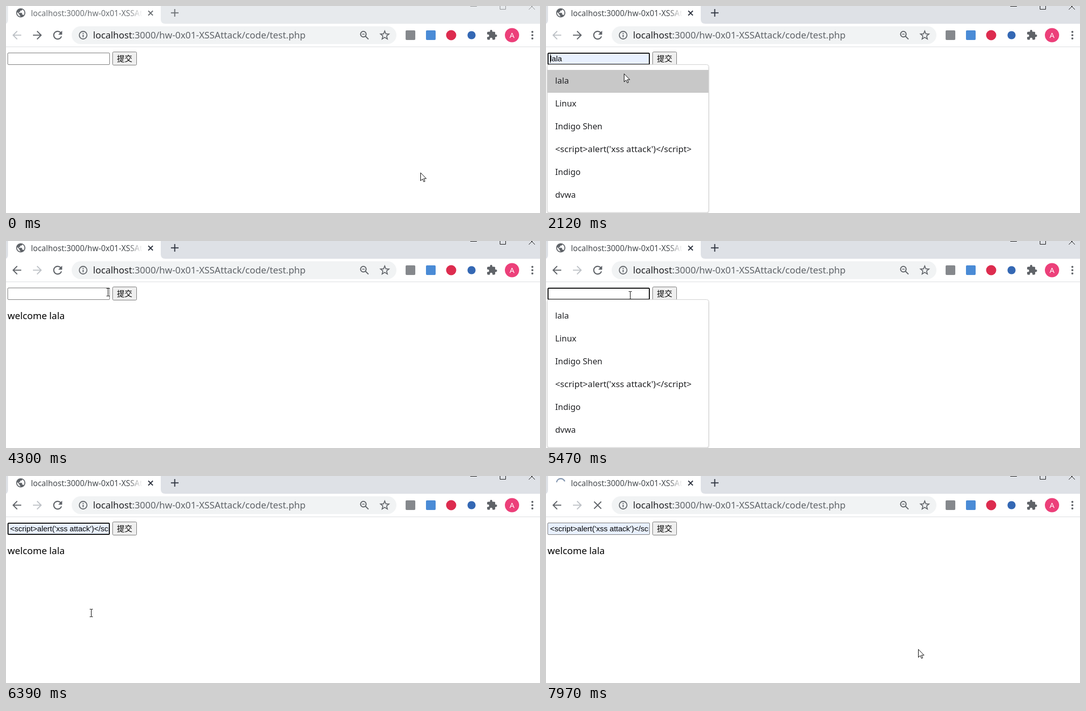
Recreate the animation shown at these times as an HTML page. Size 1049 by 408 pixels, loop 8 s.

```html
<!DOCTYPE html>
<html lang="zh">
<head>
<meta charset="utf-8">
<title>test.php</title>
<style>
  html, body { margin: 0; width: 100%; height: 100%; overflow: hidden; background: #fff; }
  svg { display: block; }
  text { font-family: "Noto Sans", "Open Sans", sans-serif; white-space: pre; }
  .field { font: 15px "Liberation Sans", Arial, sans-serif; }
  .cjk { font: 15px "Noto Sans CJK SC", "Noto Sans CJK", sans-serif; }
  .line { fill: none; stroke: #5f6368; stroke-width: 2; }
  .item { font-size: 16.4px; fill: #202124; }
  .code { font-size: 17.1px; }
  #strip { fill: #e7eaed; }
  #title, #plus, #close { color: #6c7074; }
  #wins { stroke: #8d8f91; fill: none; }
  .active #strip { fill: #dee1e6; }
  .active #title { color: #45494d; }
  .active #plus, .active #close { color: #2e3440; }
  .active #wins { stroke: #111; }
</style>
</head>
<body>
<svg id="stage" width="100%" height="100%" viewBox="0 0 1049 408">
  <defs>
    <linearGradient id="fade">
      <stop offset="0" stop-color="#fff" stop-opacity="0"/>
      <stop offset="1" stop-color="#fff"/>
    </linearGradient>
    <filter id="shadow" x="-5%" y="-5%" width="110%" height="110%">
      <feDropShadow dx="0" dy="1" stdDeviation="1" flood-opacity=".22"/>
    </filter>
  </defs>

  <!-- tab strip -->
  <rect id="strip" width="1049" height="35"/>
  <path fill="#fff" d="M0 35Q4 33 4 27V0H304V26Q304 35 313 35Z"/>
  <path id="globe" fill="#5f6368" transform="translate(18.2 2.7) scale(.9)" d="M12 2C6.48 2 2 6.48 2 12s4.48 10 10 10 10-4.48 10-10S17.52 2 12 2zm-1 17.93c-3.95-.49-7-3.85-7-7.93 0-.62.08-1.21.21-1.79L9 15v1c0 1.1.9 2 2 2v1.93zm6.9-2.54c-.26-.81-1-1.39-1.9-1.39h-1v-3c0-.55-.45-1-1-1H8v-2h2c.55 0 1-.45 1-1V7h2c1.1 0 2-.9 2-2v-.41c2.93 1.19 5 4.06 5 7.41 0 2.08-.8 3.97-2.1 5.39z"/>
  <path id="spinner" fill="none" stroke-width="2.4"/>
  <svg x="49" y="0" width="219" height="35">
    <text id="title" y="20" font-size="15.5" fill="currentColor">localhost:3000/hw-0x01-XSSAttack/code/test.php</text>
    <rect x="190" width="29" height="34" fill="url(#fade)"/>
  </svg>
  <path id="close" stroke="currentColor" stroke-width="2" d="M279.5 9.5l9 9m0-9l-9 9"/>
  <path id="plus" stroke="currentColor" stroke-width="2" d="M324 13.5h15M331.500 6v15"/>
  <path id="wins" d="M912 .5h13M970.5-5.5h11v12h-11zM1027-5l12 12M1039-5l-12 12"/>

  <!-- toolbar -->
  <path stroke="#dadce0" d="M0 80.5H1049"/>
  <path id="back" class="line" d="M30 57.5H14M22 49.5l-8 8 8 8"/>
  <path id="next" class="line" d="M53 57.5H69M61 49.5l8 8-8 8"/>
  <path id="reload" fill="#5f6368" transform="translate(88.3 44.3) scale(1.1)" d="M17.65 6.35A7.96 7.96 0 0 0 12 4a8 8 0 1 0 7.73 10h-2.08A6 6 0 1 1 12 6c1.66 0 3.14.69 4.22 1.78L13 11h7V4z"/>
  <path id="stop" class="line" d="M94.5 50.5l14 14m0-14l-14 14"/>
  <rect x="129" y="40" width="638" height="35" rx="17.5" fill="#f1f3f4"/>
  <g class="line">
    <circle cx="151.5" cy="57.5" r="7.5" stroke-width="1.8"/>
    <path d="M151.5 56.5v5M151.5 53v2"/>
    <circle cx="702" cy="55.5" r="5.5"/>
    <path d="M706 59.5l6 6"/>
    <path d="M699.5 55.5h5" stroke-width="1.5"/>
    <path id="star" stroke-width="1.7"/>
  </g>
  <text x="171" y="64" font-size="18.2" fill="#5f6368"><tspan fill="#202124">localhost</tspan>:3000/hw-0x01-XSSAttack/code/test.php</text>
  <rect x="785" y="48" width="19" height="19" rx="2" fill="#85888c"/>
  <rect x="825" y="48" width="19" height="19" rx="2" fill="#4a8bd6"/>
  <circle cx="874.5" cy="57.5" r="10" fill="#dd2c4f"/>
  <circle cx="914.5" cy="57.5" r="8" fill="#3468b4"/>
  <path fill="#5f6368" transform="translate(943.3 46) scale(.93)" d="M20.5 11H19V7c0-1.1-.9-2-2-2h-4V3.5a2.5 2.5 0 0 0-5 0V5H4c-1.1 0-2 .9-2 2v3.8h1.5a2.7 2.7 0 0 1 0 5.4H2V20c0 1.1.9 2 2 2h3.8v-1.5a2.7 2.7 0 0 1 5.4 0V22H17c1.1 0 2-.9 2-2v-4h1.5a2.5 2.5 0 0 0 0-5z"/>
  <circle cx="994" cy="57.5" r="14" fill="#ec407a"/>
  <text x="994" y="63" font-size="15" fill="#fff" text-anchor="middle">A</text>
  <path stroke="#5f6368" stroke-width="4" stroke-linecap="round" stroke-dasharray="0 6.5" d="M1034 51v14"/>

  <!-- page -->
  <rect id="input" rx="1.5"/>
  <svg x="5" y="94" width="197" height="20"><text id="value" class="field" x="3" y="15"></text></svg>
  <path id="caret" stroke="#000" d="M8.5 95v17"/>
  <rect id="button" x="209.5" y="90.5" width="47" height="26" rx="2"/>
  <text class="cjk" x="218" y="109">提交</text>
  <text id="welcome" x="3" y="154" font-size="18.45">welcome lala</text>

  <g id="menu">
    <rect x="2.5" y="115.5" width="317" height="291.5" rx="4" fill="#fff" stroke="#d2d2d2" filter="url(#shadow)"/>
    <rect id="hover" x="3" width="316" height="45" fill="#c8c8c8"/>
  </g>

  <path id="arrow" fill="#fff" stroke="#000" d="M.5.7V16.5L4.2 13 6.7 18.5 9 17.5 6.6 12.2H11.6Z"/>
  <path id="beam" fill="none" stroke="#000" d="M-3-7.5h2.5l.5.5.5-.5h2.5M0-7V7M-3 7.5h2.5l.5-.5.5.5h2.5"/>
</svg>

<script>
const LOOP = 8000;
const $ = id => document.getElementById(id);
const set = (id, attrs) => { for (const k in attrs) $(id).setAttribute(k, attrs[k]); };
const show = (id, on) => set(id, { visibility: on ? 'visible' : 'hidden' });
const within = (t, spans) => spans.some(([a, b]) => t >= a && t < b);

const script = "<script>alert('xss attack')<\/script>";
const items = ['lala', 'Linux', 'Indigo Shen', script, 'Indigo', 'dvwa'];
const ROW_TOP = 126, ROW = 45;

// Pointer moves: begin, end, steps, x, y
const moves = [
  [70, 650, 9, 150, 83], [720, 720, 1, 150, 99],
  [1720, 1950, 4, 152, 125], [2120, 2120, 1, 153, 133],
  [2190, 2340, 3, 158, 146], [2480, 2740, 4, 198, 102],
  [2910, 3060, 3, 231, 99], [3900, 4300, 6, 200, 101],
  [4440, 4680, 4, 170, 101], [4920, 4920, 1, 170, 93],
  [5000, 5000, 1, 170, 101], [5150, 5150, 1, 168, 101],
  [5470, 5470, 1, 165, 107], [5545, 5780, 4, 167, 270],
  [6460, 7020, 9, 226, 110], [7170, 7300, 2, 231, 104],
  [7560, 7970, 6, 731, 341]
];
const spans = {
  focus: [[790, 3160], [4920, 7400]],
  menu: [[940, 2410], [5000, 6390]],
  caret: [[790, 1260], [1720, 2600], [4920, 5470], [5620, 6090]],
  press: [[3160, 3240], [7400, 7470]],
  load: [[3160, 4050], [7400, LOOP]]
};
const LOADED = 4050;

function pointer(t) {
  let x = 814, y = 328;
  for (const [a, b, n, tx, ty] of moves) {
    if (t < a) break;
    const k = n === 1 ? 1 : Math.min(n, Math.floor((t - a) / (b - a) * (n - 1) + 1e-6) + 1);
    const p = k / n, e = p * p * (3 - 2 * p);
    x += (tx - x) * e;
    y += (ty - y) * e;
  }
  return [Math.round(x), Math.round(y)];
}

// Waiting arc grows counter-clockwise, then runs clockwise
function drawSpinner(elapsed) {
  const e = Math.floor(elapsed / 70) * 70;
  const p = Math.max(0, (e - 300) / 260);
  const tail = 270 - 360 * Math.min(e, 300) / 1320 + 60 * Math.max(0, p - 1);
  const head = 270 + 70 * p;
  const at = deg => {
    const r = deg * Math.PI / 180;
    return `${29 + 8.3 * Math.cos(r)} ${13.5 + 8.3 * Math.sin(r)}`;
  };
  set('spinner', {
    d: `M${at(tail)}A8.3 8.3 0 ${head - tail > 180 ? 1 : 0} 1 ${at(head)}`,
    stroke: p > 0 ? '#8497b0' : '#909498'
  });
}

function draw(t) {
  const on = {};
  for (const k in spans) on[k] = within(t, spans[k]);
  const [x, y] = pointer(t);

  $('stage').classList.toggle('active', t >= 940);
  const row = Math.floor((y - ROW_TOP) / ROW);
  const hover = on.menu && x < 319 && row >= 0 && row < items.length;
  const value = hover ? items[row]
    : t >= 6390 ? script
    : t >= 2410 && t < LOADED ? items[0] : '';

  show('menu', on.menu);
  show('hover', hover);
  set('hover', { y: ROW_TOP + ROW * Math.max(0, row) });
  if ($('value').textContent !== value) $('value').textContent = value;
  show('caret', on.caret);
  const d = on.focus ? 1 : .5;
  set('input', {
    x: 3 + d, y: 92 + d, width: 201 - 2 * d, height: 24 - 2 * d,
    'stroke-width': 2 * d, stroke: on.focus ? '#101010' : '#767676',
    fill: value ? '#e8f0fe' : '#fff'
  });

  const over = x >= 209 && x < 257 && y >= 90 && y < 117;
  set('button', {
    fill: on.press ? '#f5f5f5' : over ? '#e5e5e5' : '#efefef',
    stroke: over ? '#4f4f4f' : '#767676'
  });

  const loaded = t >= LOADED;
  show('welcome', loaded);
  $('back').style.stroke = loaded ? '#5f6368' : '#bdc1c6';
  $('next').style.stroke = loaded ? '#bdc1c6' : '#5f6368';
  show('globe', !on.load);
  show('reload', !on.load);
  show('spinner', on.load);
  show('stop', on.load);
  if (on.load) drawSpinner(t - spans.load.find(([a, b]) => t >= a && t < b)[0]);

  const inField = x < 204 && y >= 92 && y < 115;
  const beam = inField || (t >= 6390 && t < 6460);
  show('beam', beam);
  show('arrow', !beam);
  set('beam', { transform: `translate(${x + .5} ${y})` });
  set('arrow', { transform: `translate(${x} ${y})` });
}

items.forEach((label, i) => {
  const el = document.createElementNS('http://www.w3.org/2000/svg', 'text');
  el.setAttribute('class', label === script ? 'item code' : 'item');
  el.setAttribute('x', 18);
  el.setAttribute('y', 153 + ROW * i);
  el.textContent = label;
  $('menu').append(el);
});

const star = Array.from({ length: 10 }, (_, i) => {
  const r = i % 2 ? 3.8 : 8.8, a = (i * 36 - 90) * Math.PI / 180;
  return `${744 + r * Math.cos(a)} ${58 + r * Math.sin(a)}`;
});
set('star', { d: `M${star.join('L')}Z` });

const begin = performance.now();
function tick() {
  draw((performance.now() - begin) % LOOP);
  requestAnimationFrame(tick);
}
draw(0);
requestAnimationFrame(tick);
</script>
</body>
</html>
```
